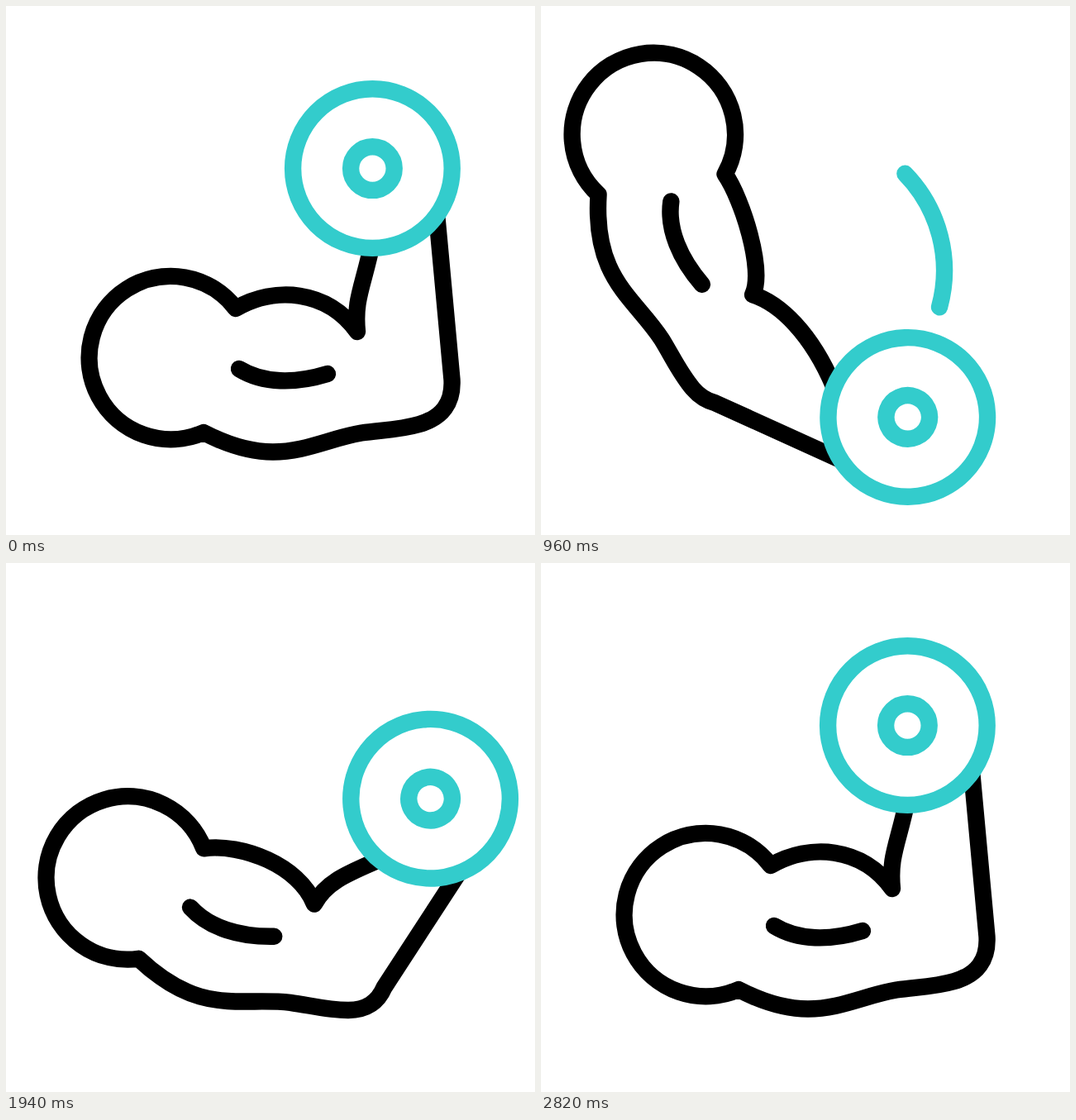
Write an HTML page that moves like this. It is 640 px wide and 640 px high and loops after 3.6 s.

```html
<!DOCTYPE html>
<html lang="en">
<head>
<meta charset="utf-8">
<title>Biceps curl</title>
<style>
  html, body { margin: 0; width: 100%; height: 100%; overflow: hidden; background: #fff; }
  svg { display: block; width: 100vw; height: 100vh; }
  path, circle { fill: none; stroke: #000; stroke-width: 20.4; stroke-linecap: round; stroke-linejoin: round; }
  #swoosh, #plate circle { stroke: #33cccc; }
  #plate .rim { fill: #fff; }
</style>
</head>
<body>
<svg viewBox="0 0 640 640">
  <path id="swoosh"/>
  <g id="body">
    <path id="arm"/>
    <path d="M282 439C311 457 350 457 389 445"/>
    <g id="plate">
      <circle class="rim" r="96.3"/>
      <circle r="26.3"/>
    </g>
  </g>
</svg>
<script>
const LOOP = 3600, STEP = 20;
const PIVOT = { x: 330, y: 212 };
const $ = id => document.getElementById(id);
const swoosh = $('swoosh'), body = $('body'), arm = $('arm'), plate = $('plate');

const mix = (a, b, u) => a + (b - a) * u;

// Progress from 0 to 1 between two times, eased like cubic-bezier(a, 0, b, 1)
function ease(t, start, end, a, b) {
  const x = (t - start) / (end - start);
  if (x <= 0) return 0;
  if (x >= 1) return 1;
  let lo = 0, hi = 1, s;
  for (let i = 0; i < 24; i++) {
    s = (lo + hi) / 2;
    const r = 1 - s;
    if (3 * a * s * r * r + 3 * b * s * s * r + s * s * s < x) lo = s; else hi = s;
  }
  return s * s * (3 - 2 * s);
}

// Out to a peak and back again
const swing = (peak, out, back) => t => peak * (ease(t, ...out) - ease(t, ...back));

const turn = swing(68.2, [0, 1200, .61, .23], [1200, 2720, .547, .12]);
const unfold = swing(1.055, [60, 1260, .665, .26], [1260, 2820, .535, .2]);
const shiftX = swing(54.5, [0, 1000, .6, .225], [1300, 2100, .68, .24]);
const shiftY = swing(-23, [0, 900, .6, .225], [1500, 2000, .68, .47]);

// The tail of the swoosh follows its head along the same sweep
const SWOOSH_LAG = 235;
const sweep = t => mix(-120.5, 45, ease(t, 380, 1180, .186, .71));

// Arm points in both poses: [flexed, extended]
const POSE = {
  wristIn: [[443, 287], [566, 349]],
  innerA: [[432, 340], [497, 348]],
  innerB: [[421, 355], [448, 368]],
  bicepsA: [[388, 343], [404, 369]],
  bicepsB: [[325, 339], [314, 359]],
  elbowA: [[528, 498], [510, 503]],
  elbowB: [[541, 480], [519, 498]],
  elbow: [[539.5, 452], [527, 488]],
  wristOut: [[520, 240], [686, 346]],
  plate: [[443.4, 196.6], [636.5, 282]]
};

function poseAt(u) {
  const p = {};
  for (const [name, [a, b]] of Object.entries(POSE)) p[name] = a.map((v, i) => mix(v, b[i], u));
  return p;
}

function armPath(p) {
  return `M${p.wristIn}C${p.innerA} ${p.innerB} 425 394` +
    `C${p.bicepsA} ${p.bicepsB} 278 366` +
    'A98.7 98.7 0 1 0 239 516C268 531 295 539.5 323 539.5' +
    'C362 539.5 392 523 430 516.5C455 513 476 513 500 506' +
    `C${p.elbowA} ${p.elbowB} ${p.elbow}L${p.wristOut}`;
}

function onCircle(deg) {
  const a = deg * Math.PI / 180;
  return [320 + 168 * Math.cos(a), 320 + 168 * Math.sin(a)];
}

function draw(t) {
  const p = poseAt(unfold(t));
  arm.setAttribute('d', armPath(p));
  plate.setAttribute('transform', `translate(${p.plate})`);
  body.setAttribute('transform',
    `translate(${shiftX(t)} ${shiftY(t)}) rotate(${turn(t)} ${PIVOT.x} ${PIVOT.y})`);

  const tail = sweep(t - SWOOSH_LAG), head = sweep(t);
  swoosh.setAttribute('d', head - tail > .5
    ? `M${onCircle(tail)}A168 168 0 0 1 ${onCircle(head)}` : '');
}

function tick() {
  const t = performance.now() % LOOP;
  draw(Math.floor(t / STEP) * STEP);
  requestAnimationFrame(tick);
}
tick();
</script>
</body>
</html>
```
